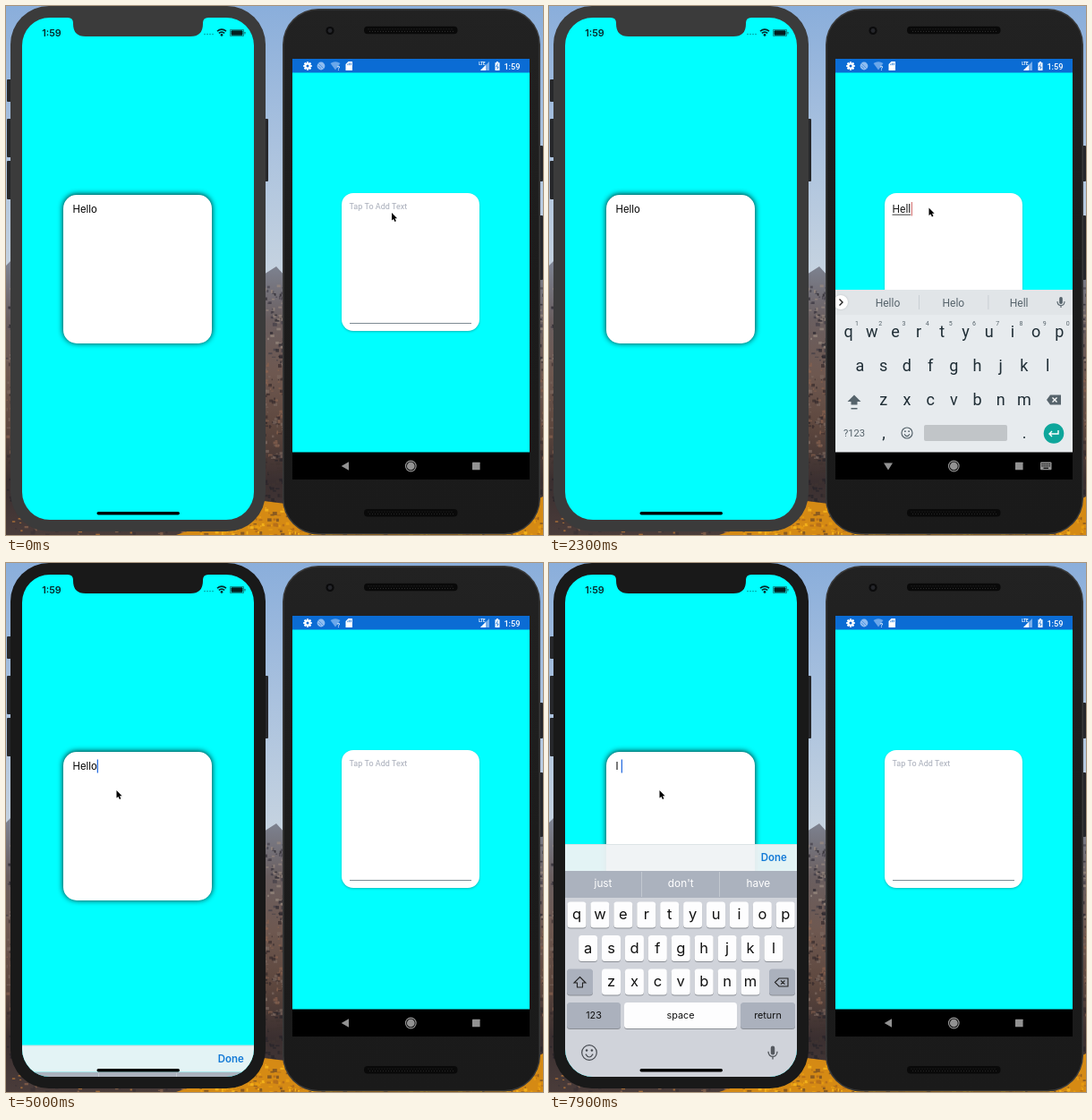
Animation, 600 px wide and 591 px high, one loop 8000 ms. Source, as an HTML page with a canvas:

```html
<!DOCTYPE html>
<html lang="en">
<head>
<meta charset="utf-8">
<title>Two phones</title>
<style>
html, body { margin: 0; width: 100%; height: 100%; overflow: hidden; }
canvas { display: block; width: 600px; height: 591px; }
</style>
</head>
<body>
<canvas></canvas>
<script>
const canvas = document.querySelector('canvas'), c = canvas.getContext('2d');
const dpr = window.devicePixelRatio || 1;
canvas.width = 600 * dpr;
canvas.height = 591 * dpr;
c.scale(dpr, dpr);

const IOS = 'Inter, sans-serif', DROID = 'Roboto, sans-serif';
const ROWS = ['qwertyuiop', 'asdfghjkl', 'zxcvbnm'];
const LOOP = 8000, STEP = 100;

const clamp = v => Math.max(0, Math.min(1, v));
const ease = v => v * v * (3 - 2 * v);

function box(x, y, w, h, r, fill) {
  c.beginPath();
  c.roundRect(x, y, w, h, r);
  c.fillStyle = fill;
  c.fill();
}
function dot(x, y, r, fill) {
  box(x - r, y - r, 2 * r, 2 * r, r, fill);
}
function shape(d, fill, stroke, width = 1, x = 0, y = 0) {
  c.save();
  c.translate(x, y);
  const path = new Path2D(d);
  if (stroke) {
    c.strokeStyle = stroke;
    c.lineWidth = width;
    c.stroke(path);
  }
  if (fill) {
    c.fillStyle = fill;
    c.fill(path);
  }
  c.restore();
}
function label(s, x, y, font, fill, align = 'center') {
  c.font = font;
  c.fillStyle = fill;
  c.textAlign = align;
  c.fillText(s, x, y);
}
function clipped(x, y, w, h, r, draw) {
  c.save();
  c.beginPath();
  c.roundRect(x, y, w, h, r);
  c.clip();
  draw();
  c.restore();
}
function shadowed(color, blur, dy, draw) {
  c.save();
  c.shadowColor = color;
  c.shadowBlur = blur * dpr;
  c.shadowOffsetY = dy * dpr;
  draw();
  c.restore();
}
function gradient(y0, y1, colors) {
  const g = c.createLinearGradient(0, y0, 0, y1);
  colors.forEach((color, i) => g.addColorStop(i / (colors.length - 1), color));
  return g;
}

// Value of the last [time, value] entry that has been reached
const at = (list, t) => list.filter(e => e[0] <= t).pop()[1];

const droidText = [[0, ''], [1600, 'H'], [1800, 'He'], [2000, 'Hel'], [2200, 'Hell'], [2400, 'Hello'],
  [2900, 'Hell'], [3000, 'Hel'], [3100, 'He'], [3200, 'H'], [3300, '']];
const iosText = [[0, 'Hello'], [6100, 'Hell'], [6300, 'Hel'], [6400, 'He'], [6500, 'H'], [6600, ''],
  [7200, 'I'], [7500, 'I ']];
const droidHints = { '': 'thanks I we', H: 'Hi Hey How', He: 'He Hey Hello', Hel: 'Hello Help Held',
  Hell: 'Hello Helo Hell', Hello: 'Hello Hellos Hell' };
const iosHints = { '': "I The I'm", H: 'He How Hey', He: 'He Hey Her', Hel: 'Help Hello Held',
  Hell: 'Hello Hell Hells', Hello: 'Hellos Helloes', I: "I I'm It", 'I ': "just don't have" };

const stops = [[0, 431, 231], [300, 431, 231], [700, 424.5, 225.5], [3300, 424.5, 225.5],
  [3600, 411, 160], [4100, 411, 160], [4600, 123.5, 254], [LOOP, 123.5, 254]];

function pointer(t) {
  const i = stops.findIndex(s => s[0] > t);
  const [t0, x0, y0] = stops[i - 1], [t1, x1, y1] = stops[i];
  const k = ease((t - t0) / (t1 - t0));
  shape('M0 0V8.6L2 6.9L3.4 10L4.9 9.3L3.5 6.3H6.1Z', '#000', '#fff', 1.2,
    x0 + (x1 - x0) * k, y0 + (y1 - y0) * k);
}

function wallpaper() {
  let seed = 7;
  const rnd = () => (seed = seed * 16807 % 2147483647) / 2147483647;
  const speckle = (n, x, y, w, h, colors) => {
    for (let i = 0; i < n; i++) {
      c.fillStyle = colors[i % colors.length];
      c.fillRect(x + rnd() * w, y + rnd() * h, 1 + rnd() * 4, 1 + rnd() * 3);
    }
  };
  c.fillStyle = gradient(0, 300, ['#8aaedb', '#a9c1de', '#c6d3e0']);
  c.fillRect(0, 0, 600, 591);
  shape('M0 290L6 284L60 320L280 306L291 298L302 291L312 302L590 300L600 292V591H0Z',
    gradient(290, 591, ['#7d8290', '#6a5f60', '#6e5850', '#5d473e', '#3a2f30', '#4a3c3a']));
  [[0, 6], [287, 25], [594, 6]].forEach(([x, w]) => {
    speckle(w * 3, x, 310, w, 90, ['#3d3a4499', '#9a8a80aa', '#28252caa']);
    speckle(w * 4, x, 395, w, 110, ['#8a6450aa', '#33292baa', '#7d6a60aa']);
    speckle(w * 2, x, 500, w, 55, ['#24222999', '#3f3431aa']);
  });
  speckle(90, 0, 555, 200, 36, ['#7a5a48', '#a06a38', '#3e3436']);
  shape('M190 591L230 578L270 566L288 553L312 556L340 566L560 568L600 548V591Z', '#d58a14');
  speckle(520, 215, 560, 385, 31, ['#e69a10', '#f2b01a', '#b8701a', '#8a5a20']);
}

function card(x, y, size, r, shade, blur, dy) {
  shadowed(shade, blur, dy, () => box(x, y, size, size, r, '#fff'));
}

function mic(x, y, color, s = 1) {
  c.save();
  c.translate(x, y);
  c.scale(s, s);
  box(-1.8, -6, 3.6, 8, 1.8, color);
  shape('M-4 -1C-4 5 4 5 4 -1M0 3.5V6', null, color, 1.1);
  c.restore();
}

function smile(x, y, r, color) {
  shape(`M${-r} 0A${r} ${r} 0 1 0 ${r} 0A${r} ${r} 0 1 0 ${-r} 0M${-r * .5} ${r * .2}Q0 ${r} ${r * .5} ${r * .2}`,
    null, color, 1.2, x, y);
  dot(x - r * .35, y - r * .3, r * .15, color);
  dot(x + r * .35, y - r * .3, r * .15, color);
}

function iosKeys(top, hints) {
  c.save();
  c.translate(0, top);
  box(18, 0, 259, 30, 0, 'rgba(240,243,245,.95)');
  box(18, 0, 259, .6, 0, '#c9d6d8');
  label('Done', 251.3, 19.3, '600 11.4px ' + IOS, '#1279d6');
  box(18, 30, 259, 30, 0, '#abb2be');
  box(18, 60, 259, 210, 0, '#d0d3da');
  box(103.2, 31, .8, 28, 0, '#c8cdd5');
  box(190.2, 31, .8, 28, 0, '#c8cdd5');
  hints.forEach((s, i) => label(s, 60.5 + i * 86.7, 47.5, '11.8px ' + IOS, '#fff'));
  const key = (x, y, w, fill = '#fdfdfe') => {
    box(x, y + 1, w, 29, 3.5, '#8b8f96');
    box(x, y, w, 29, 3.5, fill);
  };
  const grey = '#abb1bd';
  ROWS.forEach((row, j) => [...row].forEach((ch, i) => {
    const x = [31, 43.6, 69.5][j] + i * 25.92, y = 64.5 + j * 37.5;
    key(x - 10.5, y, 21);
    label(ch, x, y + 19.5, '16.5px ' + IOS, '#111');
  }));
  key(20, 139.5, 29, grey);
  key(246, 139.5, 29, grey);
  shape('M0 -6L6.5 .5H3V5.5H-3V.5H-6.5Z', null, '#222', 1.1, 34.5, 154.5);
  shape('M-7.5 0L-3 -4.5H7V4.5H-3ZM-1 -2L3.5 2.2M3.5 -2L-1 2.2', null, '#222', 1.1, 260, 154.5);
  key(20, 177, 60, grey);
  key(84, 177, 126);
  key(214, 177, 61, grey);
  [['123', 50], ['space', 147], ['return', 244.5]]
    .forEach(([s, x]) => label(s, x, 195, '10.8px ' + IOS, '#111'));
  smile(45, 233, 8.3, '#45494f');
  mic(250, 233, '#55595f', 1.25);
  c.restore();
}

function iosPhone(t) {
  const body = t >= 4700 ? '#191919' : '#3b3b3b';
  [[82, 25], [126, 43], [173, 43]].forEach(([y, h]) => box(1, y, 6, h, 1, '#26272a'));
  box(286, 126, 7, 70, 1, '#26272a');
  box(5, 0, 285, 587, 43, body);
  clipped(18, 13, 259, 561, 31, () => {
    box(18, 13, 259, 561, 0, '#0ff');
    card(64, 211, 166, 15, 'rgba(0,0,0,.9)', 6, -.5);
    const text = at(iosText, t);
    label(text, 74.5, 231.3, '11.3px ' + IOS, '#000', 'left');
    if (t >= 4900 && (t - 4900) % 1000 < 600) {
      box(74.5 + c.measureText(text).width, 219.5, 1.3, 15, 0, '#2b6fe0');
    }
    if (t >= 4960) {
      const u = (t - 4960) * .016;
      iosKeys(574 - 260 * (1 - (1 + u) * Math.exp(-u)), iosHints[text].split(' '));
    }
    shape('M69 12V13Q75 13 75 19V20Q75 34 89 34H206Q220 34 220 20V19Q220 13 226 13V12Z', body);
    label('1:59', 51, 33.6, '600 10.8px ' + IOS, '#06292b');
    for (let i = 0; i < 4; i++) dot(222 + i * 3, 31.5, .8, '#099');
    shape('M-5 -1.3Q0 -5.4 5 -1.3M-3.2 .9Q0 -1.8 3.2 .9', null, '#052a2c', 1.6, 241, 29.5);
    dot(241, 32.4, 1.4, '#052a2c');
    shape('M250.5 26.5H265.5V33.5H250.5Z', null, '#177', .8);
    box(251.5, 27.3, 13, 5.4, 1, '#031f20');
    box(266.4, 28.7, 1.1, 2.8, .5, '#177');
    box(101.5, 565, 92.5, 3.4, 1.7, '#000');
  });
}

function droidKeys(hints) {
  const ink = '#1f2d35', soft = '#56636b';
  box(320, 317, 265, 182, 0, '#e7ebee');
  box(320, 317, 265, 28, 0, '#e1e5e8');
  shadowed('#0003', 2, 0, () => dot(326, 331, 8, '#fff'));
  shape('M324.5 327.5L328 331L324.5 334.5', null, '#222', 1.4);
  box(413, 323, .8, 16, 0, '#c3c9cd');
  box(490.5, 323, .8, 16, 0, '#c3c9cd');
  hints.forEach((s, i) => label(s, 378.5 + i * 73.3, 335.5, '12px ' + DROID, soft));
  mic(572, 331, soft);
  ROWS.forEach((row, j) => [...row].forEach((ch, i) => {
    const x = [334.5, 347.5, 373.8][j] + i * 26.2;
    label(ch, x, 370 + j * 38, '18px ' + DROID, ink);
    if (!j) label((i + 1) % 10, x + 9.5, 357, '7px ' + DROID, soft);
  }));
  shape('M0 -6.5L7.5 1H3.5V4.5H-3.5V1H-7.5ZM-3.5 8H3.5V9.5H-3.5Z', soft, null, 1, 341, 441);
  shape('M-8 0L-4 -5.5H8V5.5H-4Z', soft, null, 1, 564, 440);
  shape('M-1.5 -2.5L3.5 2.5M3.5 -2.5L-1.5 2.5', null, '#fff', 1.3, 564, 440);
  label('?123', 341, 481, '11.2px ' + DROID, soft);
  label(',', 374, 483, '18px ' + DROID, ink);
  label('.', 531, 483, '18px ' + DROID, ink);
  smile(400, 477, 6, soft);
  box(419, 468, 93, 18, 2, '#c1c5c8');
  dot(564, 477.5, 11.3, '#0ea69b');
  shape('M5 -3V1H-5M-2 -2L-5 1L-2 4', null, '#fff', 1.4, 564, 477);
}

function droidStatus() {
  box(320, 59, 265, 15.5, 0, '#0b6cd4');
  for (let i = 0; i < 4; i++) {
    c.save();
    c.translate(337, 67);
    c.rotate(i * Math.PI / 4);
    box(-1.1, -4.8, 2.2, 9.6, .4, '#fff');
    c.restore();
  }
  dot(337, 67, 3.6, '#fff');
  dot(337, 67, 1.5, '#0b6cd4');
  dot(352, 67, 4.4, '#8fbdf0');
  shape('M-2.5 -2.5L2.5 2.5M-3 0L0 3', null, '#4b93e2', .9, 352, 67);
  shape('M-5.5 -3Q0 -6.5 5.5 -3L0 4.5Z', '#6aa7ea', null, 1, 368, 67);
  label('?', 371.5, 71.5, '700 7px ' + DROID, '#d5e6fa');
  shape('M379.5 65L382.5 62H387V72H379.5Z', '#fff');
  shape('M381.8 64.5V66.2M383.6 63.5V66.2M385.4 63.5V66.2', null, '#0b6cd4', .8);
  label('LTE', 532, 66, '700 4.5px ' + DROID, '#fff');
  shape('M540 62V72H530Z', '#78aeea');
  shape('M536 66V72H530Z', '#fff');
  shape('M546.5 63.2H548V62H550V63.2H551.5V72H546.5Z', '#fff');
  shape('M549.5 64.5L547.8 68H550.2L548.6 70.8', null, '#0b6cd4', .8);
  label('1:59', 574.5, 70.5, '500 9.2px ' + DROID, '#fff', 'right');
}

function droidNav(open) {
  const grey = '#929292';
  box(320, 498.5, 265, 30.5, 0, '#000');
  shape(open ? 'M-5 -3.5H5L0 4.5Z' : 'M4 -4.7V4.7L-4.3 0Z', grey, null, 1, 379, 514);
  dot(452.3, 514, 6.4, grey);
  dot(452.3, 514, 5.2, '#000');
  dot(452.3, 514, 4.4, grey);
  box(521, 509.7, 8.6, 8.6, .5, grey);
  if (!open) return;
  box(549, 509.5, 12.5, 8.8, 1, grey);
  for (let i = 0; i < 10; i++) box(550.4 + i % 5 * 2.1, 511 + (i > 4) * 2.2, 1.2, 1.2, 0, '#000');
  box(552.5, 515.7, 5.5, 1.2, 0, '#000');
}

function speaker(y) {
  box(400, y, 104.5, 8.5, 4, '#090909');
  for (let x = 405; x < 500; x += 3) {
    dot(x, y + 3, .6, '#2c2c2c');
    dot(x + 1.5, y + 5.6, .6, '#2c2c2c');
  }
}

function droidPhone(t) {
  box(595, 156, 5, 40, 1, '#26262a');
  box(595, 234, 5, 72, 1, '#26262a');
  box(309, 3, 288, 587.5, 40, '#393939');
  box(310.5, 4.5, 285, 584.5, 38.5, gradient(4, 589, ['#222', '#1c1c1c', '#1a1a1a']));
  dot(362, 27.5, 4.6, '#0b0b0c');
  dot(362, 27.5, 2.4, '#25262b');
  speaker(22.8);
  speaker(562);
  box(320, 74, 265, 425, 0, '#0ff');
  droidStatus();
  card(375, 209, 154, 13, 'rgba(0,60,60,.35)', 2.5, 1);
  box(384, 354, 136, .9, 0, '#7d8b93');
  const text = at(droidText, t);
  if (text) {
    label(text, 383.5, 231, '12px ' + DROID, '#1a1a1a', 'left');
    const w = c.measureText(text).width;
    box(383.5, 232.7, w, .9, 0, '#222');
    if (t % 1000 < 500) box(384 + w, 219, 1.3, 15.5, 0, '#d98080');
  } else {
    label('Tap To Add Text', 383.5, 227, '9px ' + DROID, '#a6abb8', 'left');
  }
  const shown = ease(clamp((t - 700) / 300)) * (1 - ease(clamp((t - 3600) / 200)));
  if (shown) {
    clipped(320, 75, 265, 424, 0, () => {
      c.globalAlpha = shown;
      c.translate(0, (1 - shown) * 70);
      droidKeys(droidHints[text].split(' '));
    });
  }
  droidNav(shown > 0);
}

let last = -1;
function frame(now) {
  const t = Math.floor(now % LOOP / STEP) * STEP;
  if (t !== last) {
    last = t;
    wallpaper();
    iosPhone(t);
    droidPhone(t);
    pointer(t);
  }
  requestAnimationFrame(frame);
}
requestAnimationFrame(frame);
</script>
</body>
</html>
```
